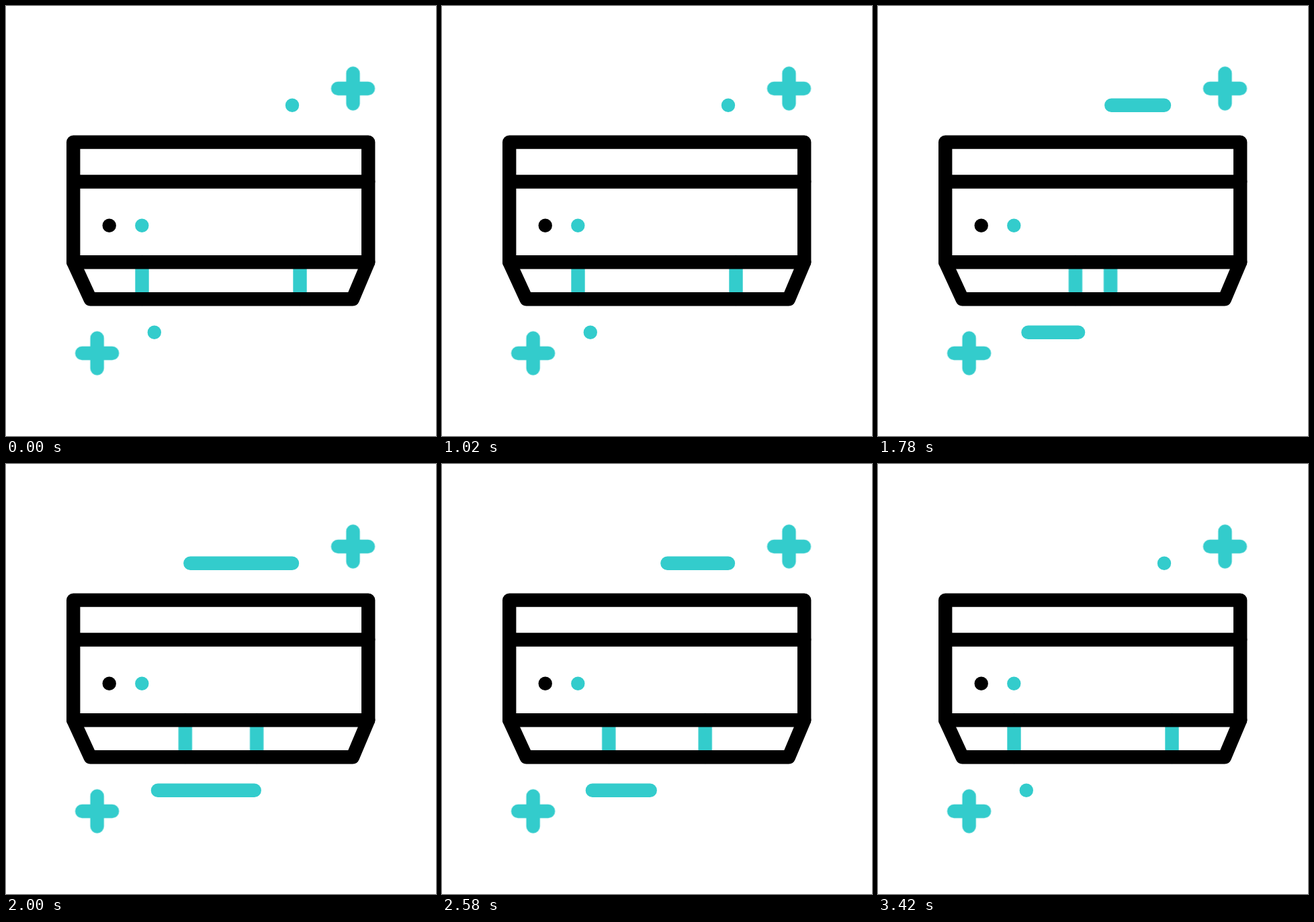
Recreate the animation shown at these times as an HTML page without scripts. Size 640x640 px, loop 3600 ms.

```html
<!DOCTYPE html>
<html lang="en">
<head>
<meta charset="utf-8">
<title>Air conditioner</title>
<style>
  html, body { margin: 0; width: 100%; height: 100%; overflow: hidden; background: #fff; }
  svg { display: block; width: 100vw; height: 100vh; }

  .ink, .teal {
    fill: none;
    stroke: #000;
    stroke-width: 20.4;
    stroke-linecap: round;
    stroke-linejoin: round;
  }
  .teal { stroke: #33cccc; }

  .vane, .breeze, .spin, .arms {
    animation: 3600ms cubic-bezier(.333, 0, .667, 1) infinite;
  }

  /* The two vanes cross over and come back. */
  .vane { animation-name: slide; }
  .left { --travel: 230px; }
  .right { --travel: -230px; }
  @keyframes slide {
    0%, 38.33% { transform: translateX(0); }
    64.17% { transform: translateX(var(--travel)); }
    92.22%, 100% { transform: translateX(0); }
  }

  .upper { animation-name: blow-left; }
  @keyframes blow-left {
    0%, 38.85% { d: path("M426 147.7H425.99"); }
    64.17% { d: path("M426 147.7H219"); }
    78.06%, 100% { d: path("M426 147.7H425.99"); }
  }

  .lower { animation-name: blow-right; }
  @keyframes blow-right {
    0%, 38.85% { d: path("M220.8 485.7H220.81"); }
    64.17% { d: path("M227.8 485.7H424"); }
    78.06%, 100% { d: path("M220.8 485.7H220.81"); }
  }

  /* Sparkles stretch, swing both ways, then shrink. */
  .spin { animation-name: swing; }
  @keyframes swing {
    0%, 39.11% { transform: rotate(0deg); }
    63.89% { transform: rotate(90deg); }
    75% { transform: rotate(-90deg); }
    86.94%, 100% { transform: rotate(0deg); }
  }

  .arms { animation-name: stretch; }
  @keyframes stretch {
    0%, 33.89% { d: path("M-22.5 0H22.5M0 -22.5V22.5"); }
    38.89%, 89.44% { d: path("M-33.3 0H33.3M0 -32.2V32.2"); }
    94.17%, 100% { d: path("M-22.5 0H22.5M0 -22.5V22.5"); }
  }
</style>
</head>
<body>
<svg viewBox="0 0 640 640">
  <defs>
    <g id="sparkle" class="teal">
      <g class="spin"><path class="arms" d="M-22.5 0H22.5M0 -22.5V22.5"/></g>
    </g>
  </defs>

  <use href="#sparkle" x="516.5" y="122.8"/>
  <use href="#sparkle" x="135.6" y="516.8"/>

  <g class="teal">
    <path class="breeze upper" d="M426 147.7H425.99"/>
    <path class="breeze lower" d="M220.8 485.7H220.81"/>
    <path class="vane left" d="M202.5 381V436"/>
    <path class="vane right" d="M437.5 381V436"/>
    <path d="M202.3 326.7h.01"/>
  </g>

  <g class="ink">
    <path d="M100.2 381.2V202.6H539.2V381.2Z"/>
    <path d="M100.2 261.5H539.2"/>
    <path d="M100.2 381.2L125.5 436.2H516L539.2 381.2"/>
    <path d="M153.7 326.7h.01"/>
  </g>
</svg>
</body>
</html>
```
